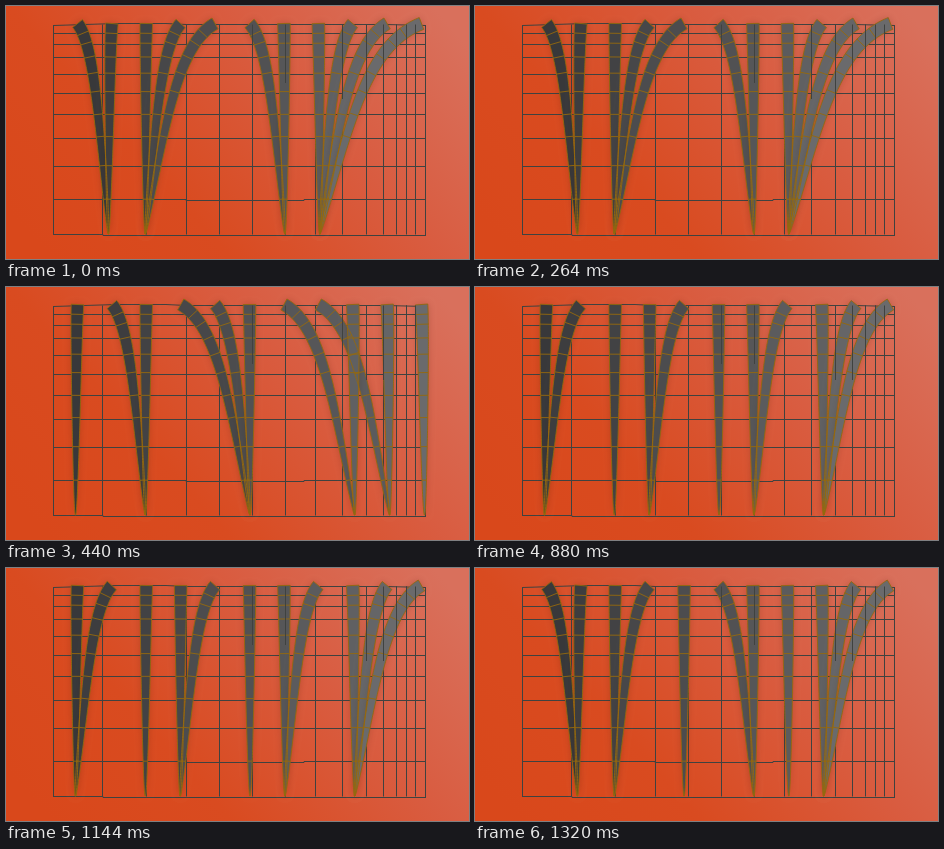
An HTML page with a canvas that plays this animation: 463x253 px, repeating every 1760 ms.

```html
<!DOCTYPE html>
<html lang="en">
<head>
<meta charset="utf-8">
<title>Blades snapping to anchors</title>
<style>
  html, body { margin: 0; width: 100%; height: 100%; overflow: hidden; background: #d9481c; }
  canvas { display: block; }
</style>
</head>
<body>
<canvas id="stage" width="463" height="253"></canvas>
<script>
const ctx = document.getElementById('stage').getContext('2d');
const STEP = 440, TOP = 18.5, BOTTOM = 228.5, LEFT = 47.5, RIGHT = 419.5;
const GRID = '#3f4240', EDGE = '#96690d';

// For each pose, the root slot that every blade top leans from.
const poses = [
  [1, 1, 2, 2, 2, 6, 6, 7, 7, 7, 7],
  [0, 2, 2, 5, 5, 5, 8, 9, 8, 9, 10],
  [0, 0, 2, 3, 3, 5, 6, 6, 8, 8, 8],
  [1, 1, 2, 2, 4, 6, 6, 7, 8, 8, 8]
];
const columns = [96, 140, 180, 213, 246, 279, 309, 336, 360, 377, 390, 400, 409];
const rows = [27, 38, 51, 68, 87, 108, 132, 160, 193];

const topX = slot => 71.5 + 34.4 * slot;
const rootX = slot => 69.5 + 34.9 * slot - (slot === 1 ? 2 : 0);

function stroke(color, ...points) {
  ctx.strokeStyle = color;
  ctx.beginPath();
  for (const point of points) ctx.lineTo(...point);
  ctx.stroke();
}

function background() {
  const fill = ctx.createLinearGradient(60, 270, 400, -30);
  fill.addColorStop(0, '#d9481b');
  fill.addColorStop(0.3, '#d94b20');
  fill.addColorStop(0.65, '#d95c40');
  fill.addColorStop(1, '#d9705c');
  ctx.fillStyle = fill;
  ctx.fillRect(0, 0, 463, 253);
}

function grid() {
  ctx.lineWidth = 1;
  for (const y of rows.slice(0, -1)) stroke(GRID, [LEFT, y + 0.5], [RIGHT, y + 0.5]);
  for (const x of columns) stroke(GRID, [x + 0.5, TOP], [x + 0.5, BOTTOM]);
  // The lowest row and the frame are slightly uneven.
  stroke(GRID, [LEFT, 193.5], [180, 193.5], [180, 194.5], [298, 194.5], [298, 193.5], [RIGHT, 193.5]);
  stroke(GRID, [LEFT, 19.5], [110, 17.5], [160, 17.5], [180, TOP], [380, TOP], [RIGHT, 19.5]);
  stroke(GRID, [LEFT, BOTTOM], [97, BOTTOM], [97, 229.5], [RIGHT, 229.5]);
  stroke(GRID, [LEFT, 19], [LEFT, 229]);
  stroke(GRID, [RIGHT, 19], [RIGHT, 230]);
}

// Left and right edge and centre height of a blade at t, from root (0) to top (1).
function section(root, top, t) {
  const d = top - root, u = 1 - t;
  const bezier = (a, b, c, e) => u*u*u*a + 3*u*u*t*b + 3*u*t*t*c + t*t*t*e;
  const slope = (a, b, c, e) => u*u*(b - a) + 2*u*t*(c - b) + t*t*(e - c);
  const xs = [0, 0.27 * d, 0.42 * d, d], ys = [228, 130, 40, 17.5];
  const x = root + bezier(...xs), y = bezier(...ys);
  const dx = slope(...xs), dy = slope(...ys), length = Math.hypot(dx, dy);
  const half = 0.3 + 6 * Math.pow((228 - y) / 210.5, 0.62);
  const nx = -dy / length * half, ny = dx / length * half;
  return { left: [x - nx, y - ny], right: [x + nx, y + ny], y };
}

function makeBlade(slot, rootSlot) {
  const steps = 100;
  const sections = Array.from({ length: steps + 1 },
    (_, i) => section(rootX(rootSlot), topX(slot), i / steps));
  const outline = new Path2D();
  for (const { left } of sections) outline.lineTo(...left);
  for (const { right } of sections.slice().reverse()) outline.lineTo(...right);
  outline.closePath();
  const ribs = rows.map(row => sections.find(s => s.y <= row + 0.5));
  return { outline, ribs, shade: 56 + 5 * slot };
}

function fillBlade({ outline, shade }) {
  ctx.save();
  ctx.shadowColor = 'rgba(60, 25, 15, 0.22)';
  ctx.shadowBlur = 7;
  ctx.fillStyle = `rgb(${shade}, ${shade}, ${shade + 2})`;
  ctx.fill(outline);
  ctx.restore();
}

function wireBlade({ outline, ribs }) {
  ctx.lineWidth = 0.9;
  ctx.strokeStyle = EDGE;
  ctx.stroke(outline);
  for (const { left, right } of ribs) stroke(EDGE, left, right);
}

// Upper parts of some grid columns pass in front of the blades.
function frontColumns() {
  ctx.lineWidth = 1;
  for (const x of columns.filter(x => x >= 246 && x !== 309))
    stroke(GRID, [x + 0.5, TOP], [x + 0.5, x < 300 ? 77 : 93]);
}

const scenes = poses.map(pose => pose.map((rootSlot, slot) => makeBlade(slot, rootSlot)));

function draw(blades) {
  background();
  grid();
  blades.forEach(fillBlade);
  blades.forEach(wireBlade);
  frontColumns();
}

const start = performance.now();
function frame() {
  const elapsed = Math.max(0, performance.now() - start);
  draw(scenes[Math.floor(elapsed / STEP) % scenes.length]);
  requestAnimationFrame(frame);
}
frame();
</script>
</body>
</html>
```
